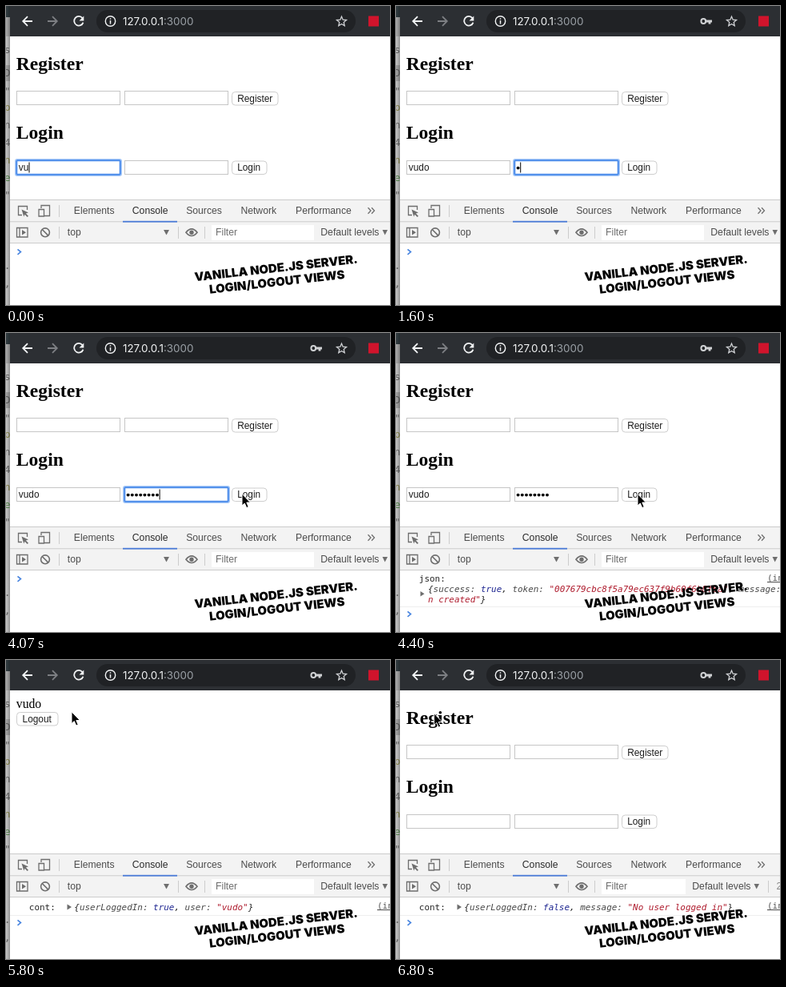
Recreate the animation shown at these times as an HTML page. Size 480 by 374 pixels, loop 7.07 s.

```html
<!DOCTYPE html>
<html lang="en">
<head>
<meta charset="utf-8">
<title>Login and logout views</title>
<style>
  html, body { margin: 0; width: 100%; height: 100%; overflow: hidden; background: #fff; }
  svg { display: block; width: 100vw; height: 100vh; }
  text { white-space: pre; font: 12.2px "Liberation Sans", Arial, sans-serif; fill: #4c4c4c; }
  .ui { font-size: 11.85px; fill: #1c1c1c; }
  .url { font: 13.4px Inter, sans-serif; fill: #f1f3f4; }
  .h { font: bold 23.6px "Liberation Serif", Times, serif; fill: #000; }
  .p { font: 15.7px "Liberation Serif", Times, serif; fill: #000; }
  .mono text { font: 10.95px "DejaVu Sans Mono", monospace; fill: #262626; }
  .mono .obj { font-style: italic; fill: #222; }
  .mono .link { fill: #555; text-decoration: underline; }
  .k { fill: #484848; }
  .s { fill: #ae1a2c; }
  .b { fill: #1d2590; }
  .cap { font: 900 14.9px Inter, sans-serif; fill: #000; }
  .side text { font: 13px "DejaVu Sans Mono", monospace; text-anchor: end; opacity: .75; }
  .line { fill: none; stroke: #6e6e6e; stroke-width: 1.3; }
  .rule { fill: none; stroke: #ccc; }
  .bar { fill: none; stroke: #f1f3f4; stroke-width: 1.8; }
  .box { fill: #fff; stroke: #c6c6c6; }
  .btn { fill: #fff; stroke: #cecece; }
  .tri { fill: #6e6e6e; }
</style>
</head>
<body>
<svg viewBox="0 0 480 374" preserveAspectRatio="none">
  <defs>
    <linearGradient id="shade">
      <stop offset="0" stop-color="#000" stop-opacity=".12"/>
      <stop offset="1" stop-color="#000" stop-opacity=".36"/>
    </linearGradient>
    <clipPath id="edge"><path d="M0 0H5V374H0Z"/></clipPath>
  </defs>
  <rect width="480" height="374" fill="#fff"/>

  <!-- editor window behind -->
  <g class="side" clip-path="url(#edge)">
    <rect width="5" height="374" fill="#e4e4e4"/>
    <rect width="5" height="14" fill="#38454a"/>
    <rect y="14" width="5" height="24" fill="#c4c4c4"/>
    <rect y="74" width="5" height="20" fill="#bdbdbd"/>
    <g id="code"></g>
    <rect width="5" height="374" fill="url(#shade)"/>
  </g>

  <!-- browser bar -->
  <rect x="5" width="475" height="38" fill="#2c2f33"/>
  <rect x="113" y="5" width="324" height="28" rx="14" fill="#202225"/>
  <path class="bar" d="M33 19H21.5M27 13.2L21.2 19L27 24.8"/>
  <path class="bar" style="stroke:#7d7f83" d="M52 19H63.5M58 13.2L63.8 19L58 24.8"/>
  <path class="bar" d="M95.6 15.2A5.8 5.8 0 1 0 96.5 20.6"/>
  <path d="M97.3 12.6V18.4H91.5Z" fill="#f1f3f4"/>
  <circle class="bar" style="stroke-width:1.4" cx="130.5" cy="19" r="6.2"/>
  <path class="bar" style="stroke-width:1.5" d="M130.5 18V22.4M130.5 15.3V16.8"/>
  <text class="url" x="146" y="23.8">127.0.0.1<tspan fill="#9aa0a6">:3000</tspan></text>
  <g id="key" fill="#d0d2d4">
    <path d="M386 17.6H395V20.4H393.4V22.6H390.6V20.4H386Z"/>
    <circle cx="384.3" cy="19" r="2.9" fill="none" stroke="#d0d2d4" stroke-width="2"/>
  </g>
  <path class="bar" style="stroke-width:1.3;stroke:#cfd1d4" d="M419.5 13.2L421.2 17.2L425.5 17.6L422.2 20.4L423.2 24.6L419.5 22.4L415.8 24.6L416.8 20.4L413.5 17.6L417.8 17.2Z"/>
  <rect x="453" y="12.5" width="13" height="13" fill="#d0142c"/>

  <!-- pages -->
  <g id="forms">
    <text class="h" x="12.8" y="79.8">Register</text>
    <text class="h" x="12.8" y="166.4">Login</text>
    <rect class="box" x="13.5" y="106.5" width="129" height="17"/>
    <rect class="box" x="148.5" y="106.5" width="129" height="17"/>
    <rect class="box" x="13.5" y="193.5" width="129" height="17"/>
    <rect class="box" x="148.5" y="193.5" width="129" height="17"/>
    <g id="ring" fill="none">
      <rect x="12" y="192" width="132" height="20" rx="2" stroke="#a9caf8" stroke-width="2"/>
      <rect x="13.3" y="193.3" width="129.4" height="17.4" rx="1" stroke="#4a8bea" stroke-width="2"/>
    </g>
    <text class="ui" id="user" x="15.8" y="206"></text>
    <g id="dots" fill="#000"></g>
    <rect id="caret" y="195.5" width="1" height="13" fill="#000"/>
    <rect class="btn" x="282.5" y="107.5" width="57.5" height="16.5" rx="4"/>
    <text class="ui" x="289.2" y="119.8">Register</text>
    <rect class="btn" x="282.5" y="194" width="43.5" height="16.5" rx="4"/>
    <text class="ui" x="289.2" y="206.2">Login</text>
  </g>
  <g id="home">
    <text class="p" x="12.8" y="60">vudo</text>
    <rect class="btn" x="13.5" y="65.5" width="51.5" height="16.5" rx="4"/>
    <text class="ui" x="20.6" y="77.8">Logout</text>
  </g>

  <!-- developer tools -->
  <rect x="5" y="242" width="475" height="55" fill="#f3f3f3"/>
  <path class="rule" d="M5 242.5H480M5 269.8H480M5 296.5H480M66.5 249V264M66.5 276V291M215.5 276V291M248.5 276V291"/>
  <rect x="146" y="268.8" width="68" height="1.8" fill="#4a7bd8"/>
  <path class="line" d="M20 261.5H15.5V250.5H26.5V255"/>
  <path class="tri" d="M19.5 254.5L28 258.5L24.8 259.6L28 262.8L26.6 264L23.5 260.8L22.3 263.5Z"/>
  <path class="line" d="M44 253V249.5H54.5V262.5H48M41 254.5H47.5V263H41Z"/>
  <text x="84.8" y="260">Elements</text>
  <text x="157.8" y="260" style="fill:#2b2b2b">Console</text>
  <text x="225.2" y="260">Sources</text>
  <text x="293.4" y="260">Network</text>
  <text x="362" y="260">Performance</text>
  <path class="line" d="M452.5 252.3L456 256L452.5 259.7M457 252.3L460.5 256L457 259.7"/>
  <path class="line" d="M13.5 277.5H27V289H13.5ZM17 277.5V289"/>
  <path class="tri" d="M20 280L25 283.2L20 286.5Z"/>
  <circle class="line" style="stroke-width:1.6" cx="49" cy="283.3" r="5.4"/>
  <path class="line" style="stroke-width:1.6" d="M45.2 279.5L52.8 287.1"/>
  <text x="76.8" y="287">top</text>
  <path class="tri" d="M197 280H204L200.5 286.5Z"/>
  <path class="line" style="stroke-width:1.7" d="M225 283.2Q232 274.6 239 283.2Q232 291.8 225 283.2Z"/>
  <circle class="tri" cx="232" cy="283.2" r="2.7"/>
  <rect id="filter" x="257" y="274" width="128" height="19" fill="#fff"/>
  <text x="262" y="287.3" style="fill:#6e6e6e">Filter</text>
  <g id="levels">
    <text x="393.3" y="287">Default levels</text>
    <path class="tri" d="M470.5 280H477L473.7 286.5Z"/>
  </g>
  <g id="hidden">
    <path class="rule" d="M465.5 276V291"/>
    <text x="475.5" y="287" style="fill:#8a8a8a">2 hidden</text>
  </g>

  <!-- console -->
  <g class="mono">
    <g id="json">
      <text x="28.8" y="311">json:</text>
      <text class="link" x="464" y="310">(index)</text>
      <path class="tri" d="M30.5 323L35.5 326.2L30.5 329.4Z"/>
      <text class="obj" x="40" y="324">{<tspan class="k">success:</tspan> <tspan class="b">true</tspan>, <tspan class="k">token:</tspan> <tspan class="s">"007679cbc8f5a79ec637f9b60f6b8f8a"</tspan>, <tspan class="k">message:</tspan></text>
      <text class="obj" x="40" y="337"><tspan class="s">n created"</tspan>}</text>
      <path class="rule" style="stroke:#eee" d="M5 342.5H480"/>
    </g>
    <g id="cont">
      <text x="28.8" y="312.8">cont:</text>
      <text class="link" x="464" y="311">(index)</text>
      <path class="tri" d="M76.5 305.5L82 309L76.5 312.5Z"/>
      <text class="obj" x="85.3" y="312.8">{<tspan class="k">userLoggedIn:</tspan> <tspan class="b">true</tspan>, <tspan class="k">user:</tspan> <tspan class="s">"vudo"</tspan>}</text>
      <path class="rule" style="stroke:#eee" d="M5 319.5H480"/>
    </g>
    <g id="out">
      <text x="28.8" y="334.6">content:</text>
      <text class="link" x="464" y="332.6">(index)</text>
      <path class="tri" d="M90.5 327.3L96 330.8L90.5 334.3Z"/>
      <text class="obj" x="99" y="334.6">{<tspan class="k">success:</tspan> <tspan class="b">true</tspan>, <tspan class="k">message:</tspan> <tspan class="s">"user logged out"</tspan>}</text>
      <path class="rule" style="stroke:#eee" d="M5 341.5H480"/>
    </g>
    <g id="anon">
      <text x="28.8" y="312.8">cont:</text>
      <text class="link" x="464" y="311">(index)</text>
      <path class="tri" d="M76.5 305.5L82 309L76.5 312.5Z"/>
      <text class="obj" x="85.3" y="312.8">{<tspan class="k">userLoggedIn:</tspan> <tspan class="b">false</tspan>, <tspan class="k">message:</tspan> <tspan class="s">"No user logged in"</tspan>}</text>
      <path class="rule" style="stroke:#eee" d="M5 319.5H480"/>
    </g>
    <path id="prompt" d="M14.5 -2.6L18.4 .6L14.5 3.8" fill="none" stroke="#4a86e0" stroke-width="1.7"/>
  </g>

  <text class="cap" transform="translate(236.3 344.3) rotate(-6.4)">VANILLA NODE.JS SERVER.</text>
  <text class="cap" transform="translate(254.7 359.8) rotate(-6.4)">LOGIN/LOGOUT VIEWS</text>

  <path id="arrow" d="M0 -.8V14L3.3 11L5.7 16.6L8.2 15.5L5.8 10H10.4Z" fill="#000" stroke="#fff"/>
  <path id="beam" d="M-2.5 -7Q0 -7 0 -5V5Q0 7 -2.5 7M2.5 -7Q0 -7 0 -5V5Q0 7 2.5 7" fill="none" stroke="#222"/>
</svg>
<script>
const LOOP = 7070, TICK = 200 / 3;
const $ = id => document.getElementById(id);
const show = (id, on) => { $(id).style.display = on ? '' : 'none'; };
const place = (id, x, y) => $(id).setAttribute('transform', `translate(${x} ${y})`);

// Each step overrides part of the state from its time on.
const steps = [
  { t: 0, page: 'forms', user: 'vu', focus: 0, dots: 0, log: [], prompt: 307 },
  { t: 130, user: 'vud' },
  { t: 270, user: 'vudo' },
  { t: 1070, focus: 1 },
  { t: 1470, dots: 1, key: true },
  { t: 1870, dots: 2 },
  { t: 2130, dots: 3 },
  { t: 2270, dots: 4 },
  { t: 2470, dots: 5 },
  { t: 2730, dots: 6 },
  { t: 2870, dots: 7 },
  { t: 3330, dots: 8 },
  { t: 4130, focus: -1 },
  { t: 4330, log: ['json'], prompt: 351 },
  { t: 4470, page: '', log: [], prompt: 307 },
  { t: 4600, page: 'home', log: ['cont'], prompt: 328 },
  { t: 6400, log: ['cont', 'out'], prompt: 350.5 },
  { t: 6470, page: '' },
  { t: 6600, log: [], prompt: 307 },
  { t: 6730, page: 'forms', user: '', dots: 0, log: ['anon'], prompt: 328, hidden: true }
];

// Pointer paths: time, x, y. Hidden between paths.
const paths = [
  { end: 1470, pts: [[600, 2, 205], [730, 40, 206], [930, 165, 207], [1070, 208, 207], [1200, 215, 208]] },
  { end: LOOP, pts: [[3730, 216, 207], [3870, 240, 205], [4070, 295, 202], [4200, 302, 202],
    [5330, 302, 202], [5400, 300, 211], [5530, 232, 160], [5670, 130, 88], [5800, 82, 65.5],
    [5930, 66, 66.5], [6000, 60, 67.5], [6070, 52, 68], [6130, 47.5, 67.5]] }
];

function pointer(t) {
  const path = paths.find(p => t >= p.pts[0][0] && t < p.end);
  if (!path) return null;
  const { pts } = path;
  const i = pts.findIndex(p => p[0] > t);
  if (i < 0) return pts[pts.length - 1].slice(1);
  const [a, b] = [pts[i - 1], pts[i]];
  const f = (t - a[0]) / (b[0] - a[0]);
  return [a[1] + (b[1] - a[1]) * f, a[2] + (b[2] - a[2]) * f];
}

const overField = (x, y) =>
  y > 193 && y < 211 && ((x > 13 && x < 143) || (x > 148 && x < 277));

function render(now) {
  const t = now % LOOP;
  const s = Object.assign({}, ...steps.filter(step => step.t <= t));

  show('forms', s.page === 'forms');
  show('home', s.page === 'home');
  show('key', s.key);
  for (const id of ['json', 'cont', 'out', 'anon']) show(id, s.log.includes(id));
  place('prompt', 0, s.prompt);

  show('hidden', s.hidden);
  place('levels', s.hidden ? -23 : 0, 0);
  $('filter').setAttribute('width', s.hidden ? 105 : 128);

  $('user').textContent = s.user;
  [...$('dots').children].forEach((dot, i) => { dot.style.display = i < s.dots ? '' : 'none'; });
  show('ring', s.focus >= 0);
  show('caret', s.focus >= 0);
  place('ring', s.focus === 1 ? 135 : 0, 0);
  const caret = s.focus === 1 ? 150 + 5.2 * s.dots : 16 + (s.page === 'forms' ? $('user').getComputedTextLength() : 0);
  $('caret').setAttribute('x', caret);

  const at = pointer(Math.ceil(Math.floor((t + 4) / TICK) * TICK / 10) * 10);
  const beam = at && s.page === 'forms' && overField(...at);
  show('arrow', at && !beam);
  show('beam', beam);
  if (at) place(beam ? 'beam' : 'arrow', ...at);
}

const NS = 'http://www.w3.org/2000/svg';
function add(parent, tag, attrs, text = '') {
  const el = document.createElementNS(NS, tag);
  for (const k in attrs) el.setAttribute(k, attrs[k]);
  el.textContent = text;
  $(parent).append(el);
}

for (let i = 0; i < 8; i++) add('dots', 'circle', { cx: 152.6 + 5.2 * i, cy: 202.6, r: 1.95 });

[['s', 59], ['D', 88], ['"', 111], ['p', 131, '#8a8420'], ['n', 153], ['4', 175],
  ['n', 197, '#8a8420'], ['e', 219, '#3c8a2e'], ['"', 241], ['y.', 329], ['e,', 351]]
  .forEach(([ch, y, fill = '#555']) => add('code', 'text', { x: 5.5, y, style: `fill:${fill}` }, ch));

let start;
function frame(now) {
  start ??= now;
  render(now - start);
  requestAnimationFrame(frame);
}
render(0);
requestAnimationFrame(frame);
</script>
</body>
</html>
```
